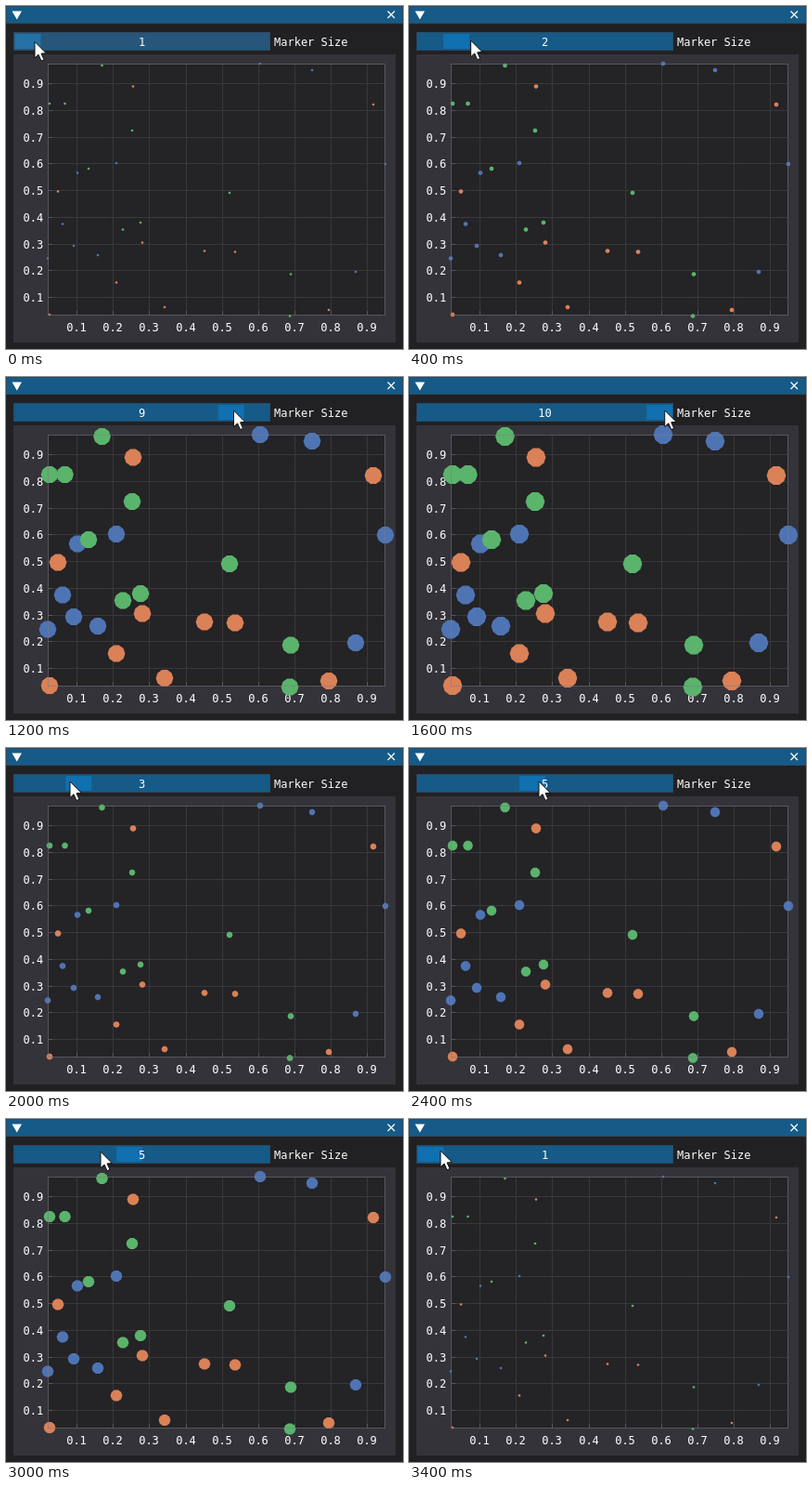
These frames come from a looping animation (428 px wide and 369 px high, 3600 ms). An HTML page with a canvas:

```html
<!DOCTYPE html>
<html lang="en">
<head>
<meta charset="utf-8">
<title>Marker Size</title>
<style>
  html, body { margin: 0; width: 100%; height: 100%; overflow: hidden; background: #212123; }
  canvas { display: block; }
</style>
</head>
<body>
<canvas id="stage" width="428" height="369"></canvas>
<script>
const ctx = document.getElementById('stage').getContext('2d');
const LOOP = 3600;
const STEP = 200;
const LAG = 25; // slider trails the pointer, markers trail the slider
const GRAB = 27.4;
const plot = { left: 45.5, top: 62.5, width: 363, height: 270 };

// Drag path: time, pointer x
const path = [
  [300, 31], [600, 138], [800, 163], [1000, 216], [1400, 275], [1680, 276], [1950, 69],
  [2020, 69], [2400, 140], [2560, 277], [2850, 277], [3000, 102], [3340, 34]
];

// The plotted samples, one scatter per series
const series = [
  ['#4f74b3', [[274, 62], [330, 69], [119, 169], [77, 179.5], [409, 170], [61, 234.5],
    [73, 258], [99, 268], [45, 271.5], [377, 286]]],
  ['#da8157', [[137, 86.5], [396, 106], [56, 199.5], [147, 254.5], [214, 263.5],
    [247, 264.5], [119, 297.5], [171, 324], [348, 327], [47, 332]]],
  ['#5ab46c', [[103.5, 64], [47, 105], [63.5, 105], [136, 134], [89, 175], [241, 201],
    [126, 240.5], [145, 233], [307, 288.5], [306, 333.5]]]
];

function pointerX(time) {
  const next = path.findIndex(([t]) => t > time);
  if (next === 0) return path[0][1];
  if (next < 0) return path.at(-1)[1];
  const [[t0, x0], [t1, x1]] = path.slice(next - 1, next + 1);
  return x0 + (x1 - x0) * (time - t0) / (t1 - t0);
}

function pointerY(time) {
  return 36 + 20 * (.5 - time / LOOP) ** 3;
}

function sliderValue(time) {
  const value = Math.round(1 + (pointerX(time) - 23) / GRAB);
  return Math.max(1, Math.min(10, value));
}

function rect(color, x, y, w, h) {
  ctx.fillStyle = color;
  ctx.fillRect(x, y, w, h);
}

function border(x, y, w, h) {
  ctx.lineWidth = 1;
  ctx.strokeStyle = 'rgba(60, 60, 66, .5)';
  ctx.strokeRect(x + .5, y + .5, w - 1, h - 1);
}

function text(label, x, y, align = 'left') {
  ctx.font = '12px "DejaVu Sans Mono", monospace';
  ctx.textAlign = align;
  ctx.fillStyle = '#fff';
  ctx.fillText(label, x, y);
}

function polygon(points) {
  ctx.beginPath();
  points.forEach(([x, y]) => ctx.lineTo(x, y));
  ctx.closePath();
}

function drawTitleBar() {
  rect('#165a87', 0, 0, 428, 19);
  border(0, 0, 428, 19);
  ctx.fillStyle = ctx.strokeStyle = '#fff';
  polygon([[6.5, 5.5], [17, 5.5], [11.75, 14.5]]);
  ctx.fill();
  ctx.lineWidth = 1.2;
  ctx.beginPath();
  ctx.moveTo(411.5, 5.5);
  ctx.lineTo(419, 13);
  ctx.moveTo(419, 5.5);
  ctx.lineTo(411.5, 13);
  ctx.stroke();
}

function drawSlider(value, active) {
  rect(active ? '#165a87' : '#26567a', 8, 28, 277, 20);
  border(8, 28, 277, 20);
  rect(active ? '#1070b0' : '#2471a6', 9.5 + (value - 1) * GRAB, 30, 28, 16);
  text(value, 146.5, 42.5, 'center');
  text('Marker Size', 289, 42.5);
}

function drawGrid() {
  rect('#35333a', 8, 52, 412, 310);
  rect('#242326', plot.left, plot.top, plot.width, plot.height);
  for (let i = 1; i <= 9; i++) {
    const x = Math.round(76.1 + (i - 1) * 39.15);
    const y = Math.round(313 - (i - 1) * 28.75);
    rect('#39383b', x, 63, 1, 269);
    rect('#39383b', 46, y, 362, 1);
    rect('#58575c', x, 328, 1, 4);
    rect('#58575c', 46, y, 4, 1);
    text('0.' + i, x, 350, 'center');
    text('0.' + i, 18.5, y + 4.5);
  }
}

function drawMarkers(size) {
  const radius = size + .4;
  for (const [color, points] of series) {
    ctx.fillStyle = color;
    for (const [x, y] of points) {
      polygon(Array.from({ length: 10 }, (_, k) => {
        const angle = k * Math.PI / 5;
        return [x + radius * Math.cos(angle), y + radius * Math.sin(angle)];
      }));
      ctx.fill();
    }
  }
  ctx.lineWidth = 1;
  ctx.strokeStyle = 'rgba(125, 124, 130, .55)';
  ctx.strokeRect(plot.left, plot.top, plot.width, plot.height);
}

function drawPointer(x, y) {
  const arrow = [[0, 0], [0, 17.5], [4, 13.8], [7, 20.5], [10, 19.2], [7, 12.7], [12.3, 12.3]];
  polygon(arrow.map(([dx, dy]) => [x + dx, y + dy]));
  ctx.fillStyle = '#fff';
  ctx.strokeStyle = '#111';
  ctx.lineWidth = 1;
  ctx.fill();
  ctx.stroke();
}

function draw(now) {
  const time = Math.floor(now % LOOP / STEP) * STEP;
  rect('#212123', 0, 0, 428, 369);
  drawTitleBar();
  drawSlider(sliderValue(time - LAG), time > path[0][0]);
  drawGrid();
  drawMarkers(sliderValue(time - 2 * LAG));
  drawPointer(pointerX(time), pointerY(time));
}

let start;
function tick(now) {
  start ??= now;
  draw(now - start);
  requestAnimationFrame(tick);
}
draw(0);
requestAnimationFrame(tick);
</script>
</body>
</html>
```
